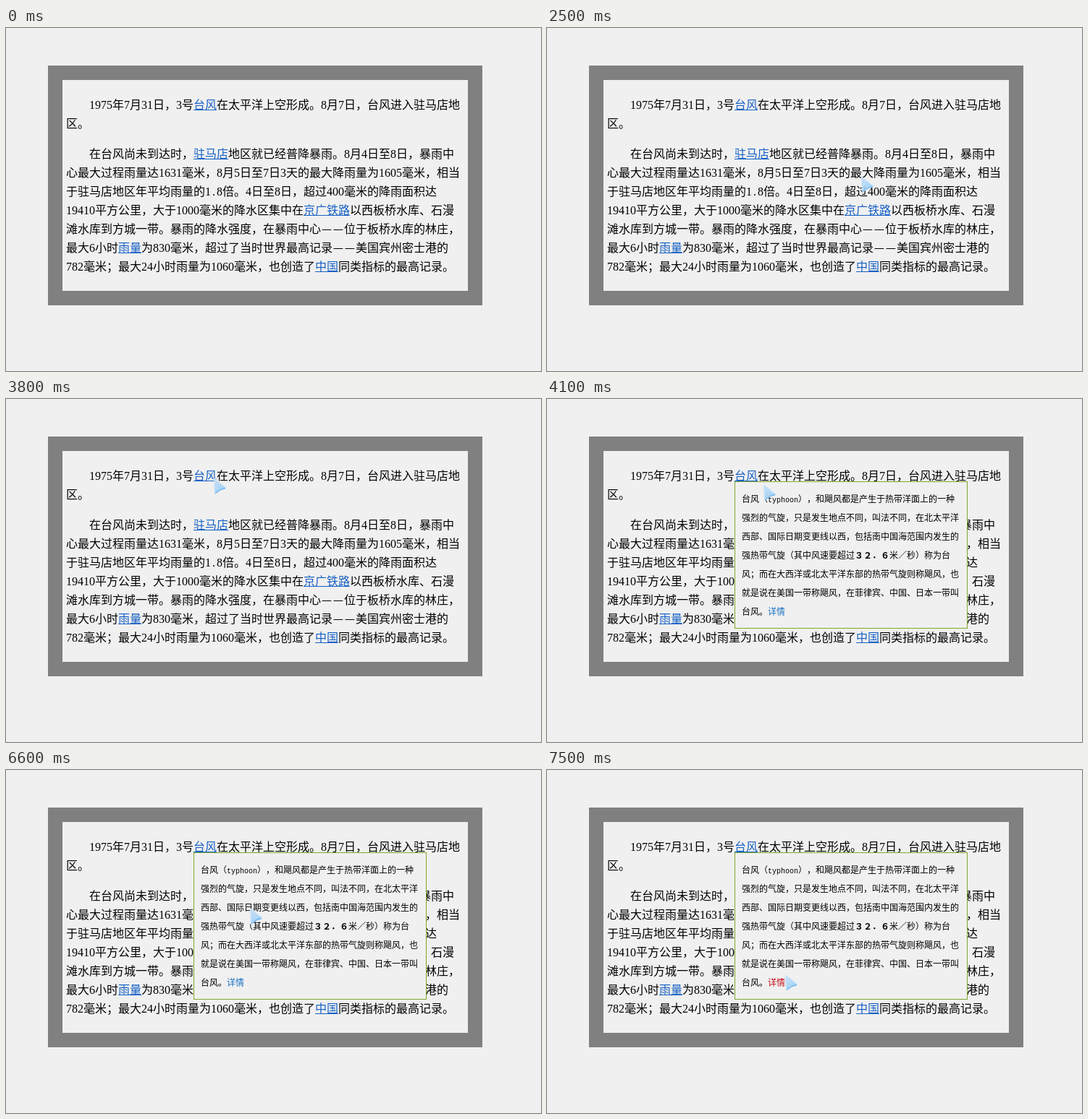
Recreate the animation shown at these times as an HTML page with a canvas. Size 739 by 475 pixels, loop 8000 ms.

```html
<!DOCTYPE html>
<html lang="zh-CN">
<head>
<meta charset="utf-8">
<title>台风</title>
<style>
html, body { margin: 0; width: 100%; height: 100%; overflow: hidden; background: #f0f0f0; }
canvas { display: block; }
</style>
</head>
<body>
<canvas id="stage" width="739" height="475"></canvas>
<script>
const ctx = document.getElementById('stage').getContext('2d');
const LOOP = 8000, STEP = 100, LINE = 26;
const SHOW_POINTER = 100, SHOW_POPUP = 3900, SHOW_HOVER = 7400;
const PAPER = '#f0f0f0', LINK = '#136ec2', HOVER = '#c00810';
const CJK = '"Noto Sans CJK SC", "Noto Sans CJK", sans-serif';

const BODY = { size: 16, weight: 300, latin: '16px "Liberation Serif", serif', link: '#1660c4', underline: true };
const NOTE = { size: 12, weight: 500, latin: '10px "Liberation Mono", monospace', link: LINK };
const NOTE_HOVER = { ...NOTE, link: HOVER };

// [ ] marks a link, { } marks bold
const intro = `　　1975年7月31日，3号[台风]在太平洋上空形成。8月7日，台风进入驻马店地
区。`;

const story = `　　在台风尚未到达时，[驻马店]地区就已经普降暴雨。8月4日至8日，暴雨中
心最大过程雨量达1631毫米，8月5日至7日3天的最大降雨量为1605毫米，相当
于驻马店地区年平均雨量的1.8倍。4日至8日，超过400毫米的降雨面积达
19410平方公里，大于1000毫米的降水区集中在[京广铁路]以西板桥水库、石漫
滩水库到方城一带。暴雨的降水强度，在暴雨中心——位于板桥水库的林庄，
最大6小时[雨量]为830毫米，超过了当时世界最高记录——美国宾州密士港的
782毫米；最大24小时雨量为1060毫米，也创造了[中国]同类指标的最高记录。`;

const note = `台风（typhoon），和飓风都是产生于热带洋面上的一种
强烈的气旋，只是发生地点不同，叫法不同，在北太平洋
西部、国际日期变更线以西，包括南中国海范围内发生的
强热带气旋（其中风速要超过{３２．６}米／秒）称为台
风；而在大西洋或北太平洋东部的热带气旋则称飓风，也
就是说在美国一带称飓风，在菲律宾、中国、日本一带叫
台风。[详情]`;

const HOME = { x: 591, y: 428 };
const MOVES = [
  { from: 1400, to: 1700, x: 542, y: 309 },
  { from: 2000, to: 2500, x: 434, y: 206 },
  { from: 2500, to: 2900, x: 316, y: 130 },
  { from: 2900, to: 3300, x: 292, y: 113 },
  { from: 3700, to: 3800, x: 287, y: 110 },
  { from: 3800, to: 4100, x: 299, y: 119 },
  { from: 5900, to: 6600, x: 337, y: 192 },
  { from: 6600, to: 6800, x: 342, y: 242 },
  { from: 6800, to: 7500, x: 329, y: 284 }
];

function rect(color, x, y, w, h) {
  ctx.fillStyle = color;
  ctx.fillRect(x, y, w, h);
}

// Full-width characters fill one em, Latin ones half an em.
function textLine(text, x, midY, style) {
  const { size } = style;
  const base = Math.round(midY + size * 0.38);
  let link = false, weight = style.weight;
  for (const ch of text) {
    if (ch === '[' || ch === ']') { link = ch === '['; continue; }
    if (ch === '{' || ch === '}') { weight = ch === '{' ? 'bold' : style.weight; continue; }
    const half = ch.charCodeAt(0) < 128;
    const pitch = half ? size / 2 : size;
    ctx.font = half ? style.latin : `${weight} ${size}px ${CJK}`;
    ctx.fillStyle = link ? style.link : '#000';
    ctx.fillText(ch, x + pitch / 2, base);
    if (link && style.underline) ctx.fillRect(x, midY + 7, pitch, 1);
    x += pitch;
  }
}

function textBlock(text, x, y, style) {
  text.split('\n').forEach((line, i) => textLine(line, x, y + i * LINE, style));
}

function drawPage() {
  rect(PAPER, 0, 0, 739, 475);
  rect('#808080', 58, 52, 600, 332);
  rect(PAPER, 78, 72, 560, 292);
  textBlock(intro, 83, 106, BODY);
  textBlock(story, 83, 174, BODY);
}

function drawPopup(style) {
  rect('#7fa82c', 259, 114, 322, 204);
  rect(PAPER, 260, 115, 320, 202);
  textBlock(note, 269, 138, style);
}

function pointerAt(t) {
  let { x, y } = HOME;
  for (const m of MOVES) {
    const k = Math.min(1, Math.max(0, (t - m.from) / (m.to - m.from)));
    x += (m.x - x) * k;
    y += (m.y - y) * k;
  }
  return [Math.round(x), Math.round(y)];
}

function drawPointer(x, y) {
  const fill = ctx.createLinearGradient(2, 5, 11, 18);
  fill.addColorStop(0, 'rgba(190,220,246,.9)');
  fill.addColorStop(1, 'rgba(158,208,246,.9)');
  const arrow = new Path2D('M1 1L16 13L9.5 15L2 20.5Z');
  ctx.save();
  ctx.translate(x, y);
  ctx.lineJoin = 'round';
  ctx.lineWidth = 2.4;
  ctx.strokeStyle = 'rgba(206,228,247,.9)';
  ctx.stroke(arrow);
  ctx.fillStyle = fill;
  ctx.fill(arrow);
  ctx.lineWidth = 1.5;
  ctx.strokeStyle = '#74b8ee';
  ctx.stroke(new Path2D('M16 13.5L9.5 15.5L2 20.5'));
  ctx.restore();
}

const start = performance.now();
let shown = -1;
ctx.textAlign = 'center';

function frame() {
  const elapsed = Math.max(0, performance.now() - start) % LOOP;
  const t = Math.floor(elapsed / STEP) * STEP;
  if (t !== shown) {
    shown = t;
    drawPage();
    if (t >= SHOW_POPUP) drawPopup(t >= SHOW_HOVER ? NOTE_HOVER : NOTE);
    if (t >= SHOW_POINTER) drawPointer(...pointerAt(t));
  }
  requestAnimationFrame(frame);
}
frame();
</script>
</body>
</html>
```
